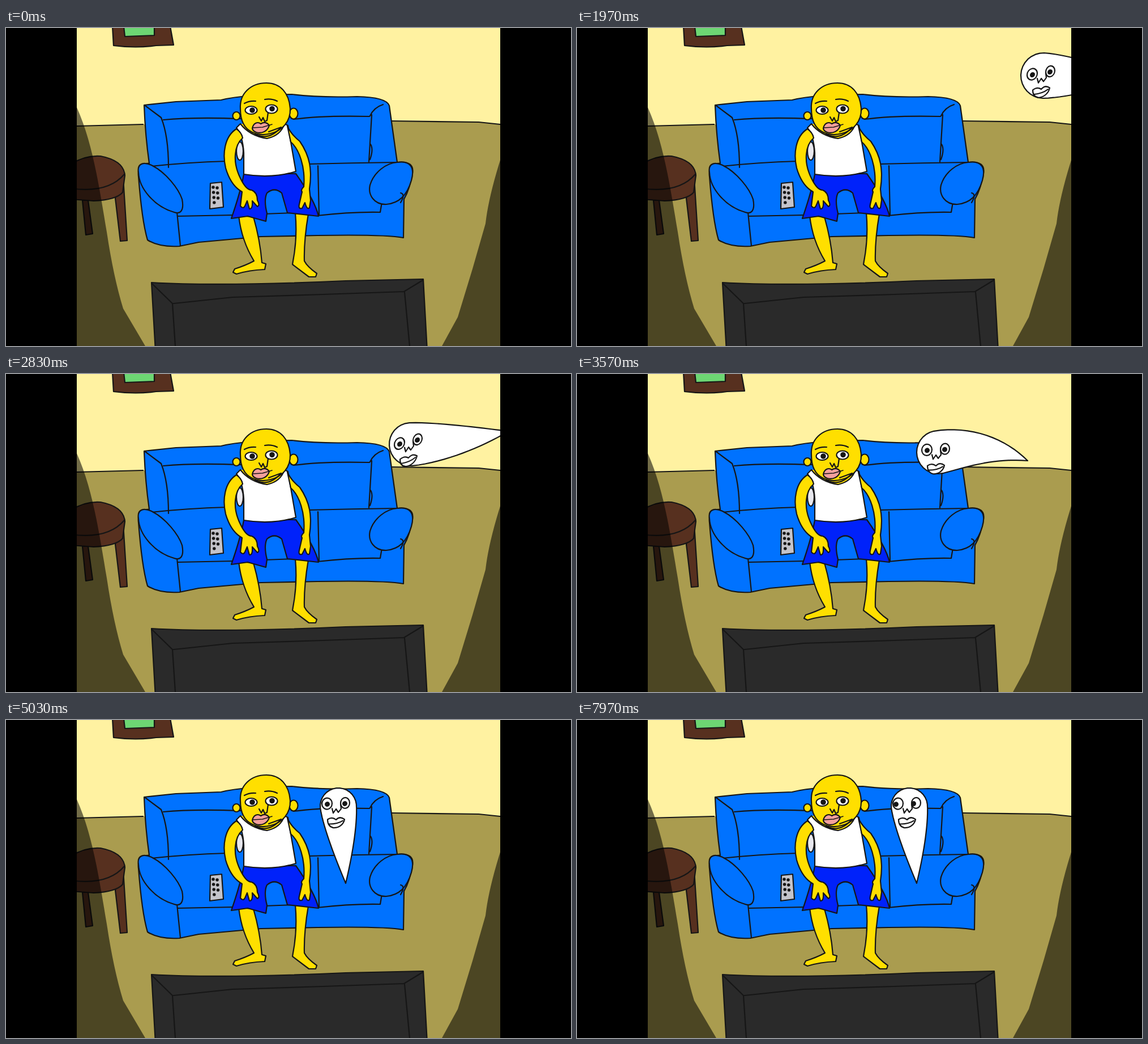
Animation of 998x561 px, one loop 8 s. Source, as an HTML page:

```html
<!DOCTYPE html>
<html lang="en">
<head>
<meta charset="utf-8">
<title>Couch visitor</title>
<style>
  html, body { margin: 0; width: 100%; height: 100%; overflow: hidden; background: #000; }
  svg { display: block; width: 100vw; height: 100vh; }
  .ink { stroke: #161616; stroke-width: 2.2; stroke-linejoin: round; stroke-linecap: round; }
  .line { fill: none; }
  .sofa { fill: #0072ff; }
  .skin { fill: #ffdf00; }
  .wood { fill: #57301f; }
  .white { fill: #fff; }
  .dot { fill: #161616; stroke: none; }
</style>
</head>
<body>
<svg viewBox="0 0 998 561">
  <!-- room -->
  <rect x="125" width="748" height="561" fill="#fff2a1"/>
  <path fill="#aa9c4f" d="M125 173L243 170L680 164L835 166L873 170V561H125Z"/>
  <g class="ink">
    <path class="line" d="M125 173L242 170M681 164L835 166L873 170"/>
    <path class="wood" d="M188 -3L190 31Q230 36 265 31L296 30L290 -3Z"/>
    <path fill="#6dd673" d="M208 -3L210 15L262 13V-3Z"/>
  </g>

  <!-- stool -->
  <g class="ink wood">
    <path d="M135 304L141 365L153 363L145 304Z"/>
    <path d="M193 300L202 376L214 375L207 264Z"/>
    <path d="M115 240Q140 224 167 226Q208 234 210 260L206 290Q195 303 155 305L115 302Z"/>
    <path class="line" d="M115 283Q180 292 209 258"/>
  </g>

  <!-- sofa -->
  <g class="ink sofa">
    <path d="M244 136L300 130L380 127Q420 117 505 117Q550 123 620 121Q672 122 677 137L691 237Q722 234 718 256Q713 285 703 302L702 370Q670 364 550 366L450 368L340 378L306 385Q270 387 250 374Q240 340 234 262Q231 238 253 239Q246 190 244 136Z"/>
    <path class="line" d="M246 137L274 158Q287 190 287 246M278 162Q330 157 415 160M508 161Q560 154 642 156M666 135Q650 140 643 155M646 153L641 236M643 204Q650 212 643 232"/>
    <path class="line" d="M256 244Q320 237 390 235M533 240Q610 238 690 237M551 243L553 330M302 325L308 384M303 332L402 330L510 326M550 331Q610 324 661 325L664 307"/>
    <path d="M234 255C231 238 244 236 257 242C283 255 305 284 311 302C315 322 308 329 297 325C262 315 235 283 234 255Z"/>
    <path d="M691 237C716 233 722 248 716 269C708 296 694 309 672 311C650 312 639 294 643 277C650 254 672 238 691 237Z"/>
    <path class="line" d="M697 291Q706 293 697 308"/>
  </g>

  <!-- remote -->
  <path class="ink" fill="#c4c4ca" d="M361 274L381 272L384 316L360 319Z"/>
  <path class="ink line" stroke-dasharray="0 9" style="stroke-width:5.5" d="M366 281L368 311M373 282L375 306"/>

  <!-- man -->
  <g class="ink">
    <g class="skin">
      <path d="M411 331Q416 375 438 411Q423 419 404 425L401 431L407 434Q430 427 457 426L459 416L452 414Q449 375 437 333Z"/>
      <path d="M511 326Q515 370 507 411L506 417L535 439H547L549 433Q532 421 527 411Q526 375 534 328Z"/>
      <path stroke="none" d="M414 169Q430 190 461 195Q485 190 492 169Z"/>
    </g>
    <path fill="#0022fa" d="M420 258Q414 290 398 336L427 332L459 341L461 327Q455 303 461 291Q474 280 487 291L497 326L552 332Q546 305 512 257Z"/>
    <ellipse cx="413" cy="217" rx="6" ry="16" fill="#e8e8ee"/>
    <path class="white" d="M407 176L414 169Q430 190 461 195Q485 190 492 169L498 172L512 253Q470 266 420 258V220Q418 190 407 176Z"/>
    <g class="skin">
      <path d="M407 178C386 191 382 222 388 247Q397 278 417 289L414 314Q419 320 422 314L426 305L430 319Q436 320 435 305L444 315Q449 313 444 304Q444 290 434 286Q424 286 414 265C399 235 404 206 418 194Q416 184 407 178Z"/>
      <path d="M497 173Q503 187 519 200C537 226 541 251 536 284L538 304L536 317Q532 322 528 308L523 318Q516 320 518 311L523 289Q520 286 526 280C529 245 518 214 503 201Z"/>
      <ellipse cx="407" cy="155" rx="6.5" ry="7"/>
      <ellipse cx="508" cy="151" rx="7.5" ry="9.5"/>
      <path d="M414 143C412 115 433 97 460 97C485 97 500 115 502 142C503 166 487 181 468 186Q450 191 435 184C420 177 414 163 414 143Z"/>
      <path class="line" d="M440 187Q464 200 486 175L464 183M421 133Q430 128 441 129M457 126Q469 124 479 129M463 149L461 163L457 165L454 158L451 164L447 157"/>
    </g>
    <path fill="#f4a09c" d="M435 177C437 167 445 165 450 169C456 165 462 167 465 172C462 182 452 187 442 184Q436 182 435 177Z"/>
    <path class="line" d="M436 176L453 175L470 170" style="stroke-width:1.6"/>
    <ellipse class="white" cx="433" cy="145" rx="10.5" ry="7"/>
    <ellipse class="white" cx="469" cy="143" rx="10.5" ry="7.5"/>
    <g id="manEyes" class="dot">
      <circle cx="435" cy="145" r="4.8"/>
      <circle cx="470" cy="142.5" r="4.8"/>
    </g>
  </g>

  <!-- television -->
  <g class="ink">
    <path fill="#2a2a2a" d="M257 449Q380 456 600 446L737 443L744 570H264Z"/>
    <path class="line" d="M258 451L294 486L299 561M296 486L400 475L560 470L703 465L736 445M704 466L713 561"/>
  </g>

  <path fill="#000" fill-opacity=".55" d="M125 140C152 200 163 270 178 360Q190 440 207 495L246 561H125ZM873 233Q852 300 847 345L824 425L798 510L770 561H873Z"/>

  <!-- ghost -->
  <g class="ink" id="ghost">
    <path class="white" id="body"/>
    <g id="face">
      <ellipse class="white" cx="-16" rx="9" ry="10"/>
      <ellipse class="white" cx="16" rx="8" ry="9.5"/>
      <path class="line" d="M8 2L9 10L4 16L0 10L-5 17L-7 9"/>
      <path class="white" d="M-15 28Q-7 23 0 29Q7 22 15 29C13 38 5 44 -5 43Q-15 40 -15 28M-13 36Q2 37 12 31"/>
      <g id="ghostEyes" class="dot">
        <circle cx="-15.5" cy="1" r="4.5"/>
        <circle cx="15.5" cy="1" r="4.5"/>
      </g>
    </g>
  </g>

  <path d="M0 0H125V561H0ZM873 0H998V561H873Z"/>
</svg>
<script>
const LOOP = 8000, ENTER = 7;
const $ = id => document.getElementById(id);
const mix = (a, b, u) => a + (b - a) * u;
const ramp = (n, from, to) => Math.min(1, Math.max(0, (n - from + 1) / (to - from + 1)));

// The ghost is a teardrop around a curved spine: head, bend and tail tip.
const poses = [
  { at: ENTER, x: 910, y: 74, bx: 986, by: 76, tx: 1086, ty: 78, r: 40, tilt: -9 },
  { at: 18, x: 824, y: 84, bx: 900, by: 86, tx: 1000, ty: 88, r: 40, tilt: -9 },
  { at: 27, x: 715, y: 124, bx: 805, by: 118, tx: 888, ty: 101, r: 38, tilt: -13 },
  { at: 34, x: 638, y: 138, bx: 725, by: 120, tx: 796, ty: 153, r: 38, tilt: -3 },
  { at: 42, x: 591, y: 147, bx: 655, by: 165, tx: 663, ty: 256, r: 37, tilt: -22 },
  { at: 49, x: 587, y: 152, bx: 594, by: 215, tx: 600, ty: 288, r: 32, tilt: -2 }
];

function poseAt(n) {
  const i = poses.findIndex(p => p.at > n);
  if (i < 0) return poses[poses.length - 1];
  const a = poses[i - 1], b = poses[i], pose = {};
  for (const key in a) pose[key] = mix(a[key], b[key], (n - a.at) / (b.at - a.at));
  return pose;
}

function teardrop(p) {
  const points = [], steps = 16;
  const edge = (s, turn) => {
    const x1 = mix(p.x, p.bx, s), y1 = mix(p.y, p.by, s);
    const x2 = mix(p.bx, p.tx, s), y2 = mix(p.by, p.ty, s);
    const angle = Math.atan2(y2 - y1, x2 - x1) + turn;
    const half = p.r * (1 - s ** 1.5);
    points.push(`${mix(x1, x2, s) + half * Math.cos(angle)} ${mix(y1, y2, s) + half * Math.sin(angle)}`);
  };
  for (let i = steps; i > 0; i--) edge(i / steps, Math.PI / 2);
  for (let i = 0; i <= steps; i++) edge(0, Math.PI * (0.5 + i / steps));
  for (let i = 1; i < steps; i++) edge(i / steps, -Math.PI / 2);
  return `M${points.join('L')}Z`;
}

// Drawings change ten times a second, seen on a fifteen-per-second clock.
function drawingAt(t) {
  const k = Math.floor((t - 170) / 200);
  return 2 * k + (t - 170 - 200 * k >= 60 ? 1 : 0);
}

function draw(t) {
  const n = drawingAt(t);
  const pose = poseAt(Math.max(n, ENTER));
  $('ghost').style.display = n < ENTER ? 'none' : '';
  $('body').setAttribute('d', teardrop(pose));
  $('face').setAttribute('transform', `translate(${pose.x - 4} ${pose.y - 5}) skewY(${pose.tilt})`);

  // They glance at each other, look away, and the ghost peeks again.
  const man = 4.5 * (ramp(n, 54, 58) - ramp(n, 61, 64));
  const ghost = -4 * (ramp(n, 54, 58) - ramp(n, 67, 70) + ramp(n, 73, 77));
  $('manEyes').setAttribute('transform', `translate(${man} 0)`);
  $('ghostEyes').setAttribute('transform', `translate(${ghost} 0)`);
}

const start = performance.now();
function tick() {
  draw((performance.now() - start) % LOOP);
  requestAnimationFrame(tick);
}
tick();
</script>
</body>
</html>
```
